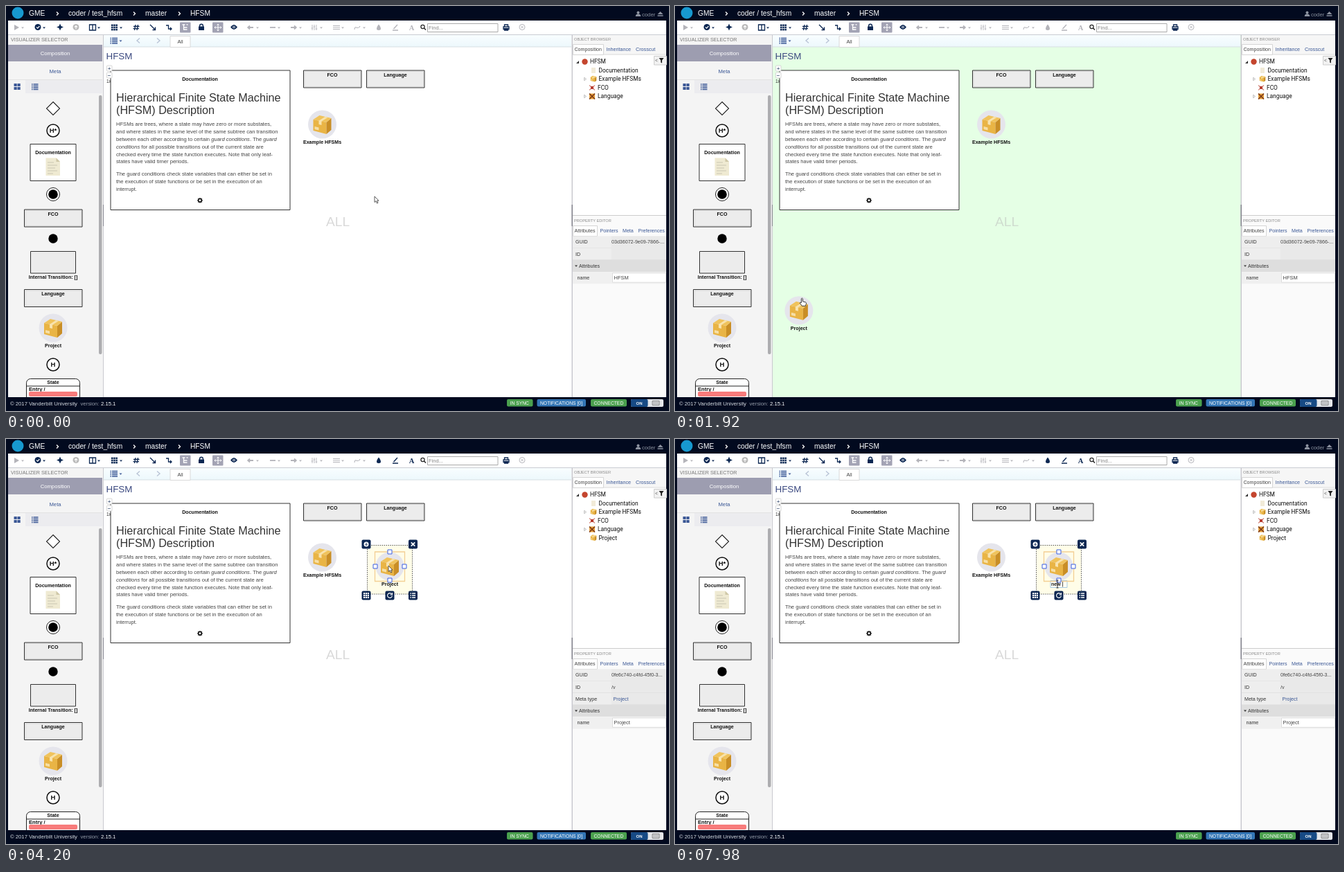
Recreate the animation shown at these times as an HTML page with a canvas. Size 957 by 585 pixels, loop 8 s.

```html
<!DOCTYPE html>
<html lang="en">
<head>
<meta charset="utf-8">
<title>State machine editor</title>
<style>
  html, body { margin: 0; width: 100%; height: 100%; overflow: hidden; background: #020a1f; }
  canvas { display: block; }
</style>
</head>
<body>
<canvas id="stage" width="957" height="585"></canvas>
<script>
const ctx = document.getElementById('stage').getContext('2d');
const LOOP = 8000;
const NAVY = '#0c2752', LINK = '#3a5795', GREY = '#b4b4ba', DARK = '#020a1f';

// ---- drawing helpers ----
function rect(x, y, w, h, fill, stroke, radius = 0, lineWidth = 1) {
  ctx.beginPath();
  ctx.roundRect(x, y, w, h, radius);
  paint(fill, stroke, lineWidth);
}
function circle(x, y, r, fill, stroke, lineWidth = 1) {
  ctx.beginPath();
  ctx.arc(x, y, r, 0, Math.PI * 2);
  paint(fill, stroke, lineWidth);
}
function paint(fill, stroke, lineWidth) {
  ctx.lineWidth = lineWidth;
  if (fill) { ctx.fillStyle = fill; ctx.fill(); }
  if (stroke) { ctx.strokeStyle = stroke; ctx.stroke(); }
}
function path(x, y, d, fill, stroke, lineWidth = 1) {
  const shape = new Path2D(d);
  ctx.save();
  ctx.translate(x, y);
  ctx.lineWidth = lineWidth;
  if (fill) { ctx.fillStyle = fill; ctx.fill(shape); }
  if (stroke) { ctx.strokeStyle = stroke; ctx.stroke(shape); }
  ctx.restore();
}
// y is the middle of the capital letters
function text(s, x, y, size, color = '#333', { style = '', align = 'left', font = 'Liberation Sans' } = {}) {
  ctx.font = `${style} ${size}px "${font}", Arial, sans-serif`;
  ctx.fillStyle = color;
  ctx.textAlign = align;
  ctx.fillText(s, x, y + size * 0.35);
  return ctx.measureText(s).width;
}
const label = (s, x, y) => text(s, x, y, 7.1, '#111', { style: 'bold', align: 'center' });
// parts between asterisks are italic
function richText(s, x, y, size, color) {
  s.split('*').forEach((part, i) => {
    x += text(part, x, y, size, color, { style: i % 2 ? 'italic' : '' });
  });
}
const caret = (x, y, color) => path(x, y, 'M-2 -1h4l-2 2.3z', color);

function gradient(y0, y1, from, to) {
  const g = ctx.createLinearGradient(0, y0, 0, y1);
  g.addColorStop(0, from);
  g.addColorStop(1, to);
  return g;
}

// ---- reusable pictures ----
function packageBox(x, y, scale = 1) {
  ctx.save();
  ctx.translate(x, y);
  ctx.scale(scale, scale);
  path(0, 0, 'M-13 -7L6 -3V14L-13 9z', '#e9b445');
  path(0, 0, 'M6 -3L13 -9V8L6 14z', '#c98e26');
  path(0, 0, 'M-13 -7L-4 -13L13 -9L6 -3z', '#f0c35c');
  path(0, 0, 'M-5 -5.3L4 -11L8 -10L-1 -4.5V1L-5 0z', '#f8e3ae');
  path(0, 0, 'M-11 3l6 1.4v4l-6 -1.5z', '#f6dfa6');
  ctx.restore();
}
function project(x, y, name) {
  circle(x, y, 20.5, '#e5e5ec');
  packageBox(x, y);
  if (name) label(name, x, y + 25.5);
}
function classBox(x, y, name) {
  rect(x + .5, y + .5, 83.5, 25, '#ececec', '#333');
  rect(x + 2, y + 2, 80.5, 22, null, '#dcdcdc');
  label(name, x + 42, y + 7);
}
function badge(s, x, w, fill) {
  rect(x, 568, w, 10.5, fill, null, 2);
  text(s, x + 4.5, 573.2, 6.75, '#fff');
}

// ---- interface ----
function header() {
  rect(0, 0, 957, 585, DARK);
  circle(17, 10, 8.5, '#1799cf');
  text('GME', 33, 10.5, 10.2, '#fff');
  text('coder / test_hfsm', 90, 10.5, 10.2, '#fff');
  text('master', 201, 10.5, 10.2, '#fff');
  text('HFSM', 266, 10.5, 10.2, '#fff');
  for (const x of [73, 184, 249]) path(x, 11, 'M0 -2.5l2.5 2.5l-2.5 2.5', null, '#fff', 1.3);
  circle(912.5, 9.5, 2, '#8d93a0');
  path(912.5, 15, 'M-3.8 0c0 -5 7.6 -5 7.6 0z', '#8d93a0');
  text('coder', 918, 12, 7.7, '#8d93a0');
  path(944.5, 12, 'M-4 0L0 -4L4 0zM-4 1.3h8v1.5h-8z', '#8d93a0');
}

function toolbar(selected) {
  rect(3, 21, 950, 21, '#fff');
  rect(3, 41, 950, 1, '#c9ccd2');
  const y = 31;
  const carets = { 24: GREY, 55: NAVY, 134: NAVY, 166: NAVY, 363: GREY, 394: GREY, 425: GREY, 455: GREY, 486: GREY, 517: GREY };
  for (const x in carets) caret(+x, y + .5, carets[x]);
  path(15, y, 'M-3 -4L4 0L-3 4z', GREY);
  circle(46, y - .5, 4.5, NAVY);
  path(46, y - .5, 'M-2 0l1.6 1.7l2.8 -3.2', null, '#fff', 1.2);
  path(78, y - .5, 'M0 -5l1.5 3.5L5 0L1.5 1.5L0 5L-1.5 1.5L-5 0L-1.5 -1.5z', NAVY);
  circle(101, y - .5, 4.5, '#bbb');
  path(101, y - .5, 'M0 3v-5m-2 2l2 -2l2 2', null, '#fff', 1.1);
  path(125, y, 'M-4.5 -4h9v8h-9zM0 -4v8', null, NAVY, 1.3);
  for (let i = 0; i < 9; i++) rect(152 + i % 3 * 3.2, 26.5 + Math.floor(i / 3) * 3.2, 2.5, 2.5, NAVY);
  path(188, y, 'M-1 -4l-1.5 8M2.5 -4l-1.5 8M-4 -1.5h8.5M-4.5 1.7h8.5', null, NAVY, 1.3);
  path(212, y, 'M-4 -4L3 3M3.5 -.5v4h-4', null, NAVY, 1.4);
  path(235, y, 'M-4 -3h3.5v5h4M2 0l2 2l-2 2', null, NAVY, 1.3);
  for (const x of [251, 298]) rect(x, 23.5, 15.5, 15, '#a3a3b4', null, 1);
  path(258.5, y, 'M-4 -4h4M-2 -4v7h5M-2 0h5M2 -4h2', null, '#fff', 1.3);
  path(306, y, 'M0 -5v10M-5 0h10M-1.5 -3.5L0 -5l1.5 1.5M-1.5 3.5L0 5l1.5 -1.5M-3.5 -1.5L-5 0l1.5 1.5M3.5 -1.5L5 0l-1.5 1.5', null, '#fff');
  rect(278, 29.5, 8, 5.5, NAVY);
  path(282, y, 'M-2.4 -1v-1.3a2.4 2.4 0 0 1 4.8 0V-1', null, NAVY, 1.4);
  path(329, y - .5, 'M-5 0Q0 -7 5 0Q0 7 -5 0z', NAVY);
  circle(329, y - .5, 1.8, '#fff');
  circle(329, y - .5, 1, NAVY);
  path(353, y, 'M4 0h-7M-1 -2.5l-2.8 2.5l2.8 2.5', null, GREY, 1.8);
  path(385, y, 'M-4 0h8', null, GREY, 1.8);
  path(415, y, 'M-4 0h7M1 -2.5l2.8 2.5l-2.8 2.5', null, GREY, 1.8);
  path(445, y, 'M-3 -4v8M0 -4v8M3 -4v8M-4.3 1h2.6M-1.3 -1h2.6M1.7 2h2.6', null, GREY, .9);
  path(477, y, 'M-5 -2.5h10M-5 0h10M-5 2.5h10', null, GREY, 1.2);
  path(507, y, 'M-4 3c1 -8 5 2 8 -5', null, GREY, 1.1);
  const styleColor = selected ? NAVY : GREY;
  path(538, y, 'M0 -4.5C4 .5 4 4 0 4S-4 .5 0 -4.5z', styleColor);
  path(562, y, 'M-2.5 2L3 -4M-4 4h8', null, styleColor, 1.4);
  text('A', 585.5, y, 10.5, styleColor, { align: 'center', font: 'Liberation Serif', style: 'bold' });
  circle(601.5, y - 1, 2.6, null, '#222', 1.2);
  path(603.5, y + 1, 'M0 0l2.5 2.5', null, '#222', 1.4);
  rect(608.5, 25.5, 101.5, 12, '#fff', '#aaa');
  text('Find...', 610, y, 7.5, '#888');
  path(722, y, 'M-2.5 -1v-3h5v3M-4 -1h8v3.5h-8zM-2.5 1.5h5v2.5h-5z', null, NAVY, 1.3);
  circle(745, y - .5, 4, null, GREY);
  path(745, y - .5, 'M-1.5 -1.5l3 3m0 -3l-3 3', null, GREY);
}

function palette() {
  rect(3, 42, 137, 523, '#f4f4f4');
  text('VISUALIZER SELECTOR', 7, 48, 7.2, '#777');
  rect(3, 56, 136, 24, '#9d9db0');
  text('Composition', 71, 68.5, 7.7, '#fff', { align: 'center' });
  text('Meta', 71, 94, 7.7, LINK, { align: 'center' });
  rect(3, 106, 136, 1, '#e2e2e2');
  rect(28, 107, 111, 19, '#ececef');
  for (const [x, y] of [[11.5, 112], [16.5, 112], [11.5, 117], [16.5, 117]]) rect(x, y, 4.2, 4, LINK);
  path(41.5, 116.5, 'M-2 -3.5h7M-2 -1h7M-2 1.5h7M-2 4h7M-4.5 -3.5h1.5M-4.5 -1h1.5M-4.5 1.5h1.5M-4.5 4h1.5', null, LINK, 1.4);
  rect(134, 129, 4.5, 374, '#adadb0', null, 2);

  path(68, 148, 'M0 -9.5L9.5 0L0 9.5L-9.5 0z', '#fff', '#222', 1.1);
  for (const [s, y] of [['H*', 180], ['H', 518]]) {
    circle(68, y, 9, '#fff', '#111', 1.5);
    text(s, 68, y, 9.5, '#111', { style: 'bold', align: 'center' });
  }
  rect(35, 199.5, 66, 53, '#fff', '#333');
  label('Documentation', 68, 211.5);
  path(57.5, 219.5, 'M0 0h15l5.5 5.5v20h-20.5z', '#efead2');
  path(57.5, 219.5, 'M15 0v5.5h5.5z', '#cfc8a8');
  path(60, 226, 'M0 0h9M0 4h14M0 8h11M0 12h14M0 16h8', null, '#c4c1ae', .9);
  circle(68, 272, 9.5, '#fff', '#222');
  circle(68, 272, 6.8, '#000');
  classBox(26, 293.5, 'FCO');
  circle(68, 336, 6.7, '#000');
  rect(35.5, 354.5, 65, 31.5, '#ececec', '#333');
  label('Internal Transition: []', 68, 392);
  classBox(26, 409, 'Language');
  project(68, 465, 'Project');

  rect(29.5, 538.5, 77, 40, '#fff', '#222', 6);
  label('State', 68, 543.5);
  rect(29.5, 548.5, 77, 1, '#222');
  text('Entry /', 33, 553, 7.6, '#111', { style: 'bold' });
  rect(33, 557, 70, 7, '#f87b7b', null, 2);
}

function documentBox() {
  rect(151, 93, 259, 201.5, '#fff', '#333');
  label('Documentation', 280, 106);
  text('Hierarchical Finite State Machine', 159, 132.5, 16.2);
  text('(HFSM) Description', 159, 150.5, 16.2);
  [
    'HFSMs are trees, where a state may have zero or more substates,',
    'and where states in the same level of the same subtree can transition',
    'between each other according to certain *guard conditions*. The *guard',
    '*conditions* for all possible transitions out of the current state are',
    'checked every time the state function executes. Note that only leaf-',
    'states have valid timer periods.'
  ].forEach((line, i) => richText(i === 3 ? '*' + line.slice(1) : line, 159, 170.7 + i * 10.8, 7.6, '#444'));
  [
    'The guard conditions check state variables that can either be set in',
    'the execution of state functions or be set in the execution of an',
    'interrupt.'
  ].forEach((line, i) => text(line, 159, 242.3 + i * 10.8, 7.6, '#444'));
  circle(280, 280.7, 2.2, null, '#111', 1.5);
  for (let i = 0; i < 8; i++) {
    const a = i * Math.PI / 4, c = Math.cos(a), s = Math.sin(a);
    path(280, 280.7, `M${c * 2.4} ${s * 2.4}L${c * 3.8} ${s * 3.8}`, null, '#111', 1.4);
  }
}

function canvasPanel(accepting) {
  rect(140, 42, 678, 523, accepting ? '#e5ffe5' : '#fff');
  rect(141, 42, 675, 17, gradient(42, 59, '#f8fdff', '#edf8fc'));
  rect(141, 58.5, 675, 1, '#d7dfe3');
  rect(237, 43.5, 29, 16, '#fff', '#d9d9d9');
  text('All', 251.5, 51.5, 7.4, '#444', { align: 'center' });
  path(155, 50, 'M-2 -3.5h8M-2 -1h8M-2 1.5h8M-2 4h8M-4.5 -3.5h1.5M-4.5 -1h1.5M-4.5 1.5h1.5M-4.5 4h1.5', null, LINK, 1.5);
  caret(165.5, 50.5, LINK);
  path(190, 50, 'M3 -3.5L-1 0l4 3.5', null, '#b9c4d6', 1.4);
  path(220, 50, 'M-2 -3.5L2 0l-4 3.5', null, '#b9c4d6', 1.4);
  text('HFSM', 144.5, 72.5, 13.4, '#3c4a80');
  text('ALL', 479, 311, 19.2, accepting ? '#cfdccf' : '#d9d9d9', { align: 'center' });
  text('1x', 145, 109, 6.5);
  documentBox();
  for (const [s, y] of [['+', 90], ['−', 100]]) {
    rect(145.5, y - 4, 7.5, 8, '#fff', '#ccc', 1, .8);
    text(s, 149.2, y, 8, NAVY, { align: 'center' });
  }
  classBox(429, 92.5, 'FCO');
  classBox(520, 92.5, 'Language');
  project(456.5, 171, 'Example HFSMs');
  for (const x of [139.5, 816.5]) {
    rect(x, 42, 1.5, 523, '#c9c9cf');
    rect(x, 287, 1.5, 31, '#85858f');
  }
}

function objectBrowser(created) {
  rect(818, 42, 135, 523, '#fff');
  rect(818, 42, 135, 27, '#f6f6f6');
  text('OBJECT BROWSER', 820, 48, 5.65, '#888');
  rect(818.5, 55.5, 44, 15, '#fff', '#d5d5d5');
  text('Composition', 820.5, 62.5, 7.1, '#444');
  text('Inheritance', 866.5, 62.5, 7.2, LINK);
  text('Crosscut', 909, 62.5, 7.2, LINK);
  rect(863, 69.5, 90, 1, '#d5d5d5');
  rect(935.5, 72.5, 18, 12.5, '#f2f2f2', '#ccc');
  text('<', 937, 78.5, 6.5, '#555');
  path(946, 78.5, 'M-3.5 -3.5h7l-2.6 3.5v4l-1.8 -1v-3z', '#222');

  const item = (s, x, y) => text(s, x, y, 8.4, '#111', { font: 'Roboto' });
  path(825, 81, 'M2 -2v4h-4z', '#333');
  circle(835.5, 80.5, 4.2, '#c4452e');
  item('HFSM', 843, 80.5);
  rect(845, 89, 6, 8, '#f1ebd8');
  item('Documentation', 855.5, 93);
  packageBox(848, 105, .33);
  item('Example HFSMs', 855.5, 105.5);
  path(846, 118, 'M-4 -3.5l8 7m0 -7l-8 7', null, '#d58a80', 1.4);
  rect(844, 116, 4, 4, '#b83d30');
  item('FCO', 854, 118);
  rect(842, 126.5, 8, 8, '#e7a03a');
  path(846, 130.5, 'M-4 -4l8 8m0 -8l-8 8', null, '#7c3a1c', 1.6);
  item('Language', 854, 130.5);
  for (const y of [105.5, 130.5]) path(836, y, 'M-1.3 -2.2L1.5 0L-1.3 2.2z', null, '#aaa', .8);
  if (created) {
    packageBox(848, 142.5, .33);
    item('Project', 855.5, 143);
  }
}

function propertyEditor(selected) {
  rect(818, 302, 135, 263, '#fafafa');
  rect(818, 302, 135, 1, '#ccc');
  text('PROPERTY EDITOR', 820, 310, 5.65, '#888');
  rect(818.5, 317.5, 35, 15, '#fff', '#d5d5d5');
  text('Attributes', 820.5, 324.5, 7.1, '#444');
  text('Pointers', 857.5, 324.5, 7.1, LINK);
  text('Meta', 890, 324.5, 7.1, LINK);
  text('Preferences', 912.5, 324.5, 7.1, LINK);
  let y = 332.5;
  const row = (name, value = '', color = '#444') => {
    rect(818, y, 135, 16.8, '#eeeeee');
    rect(874, y, 79, 16.8, '#e9e9e9');
    rect(818, y + 16.5, 135, .8, '#dcdcdc');
    text(name, 822, y + 8.5, 7.1);
    text(value, name === 'Meta type' ? 876.5 : 874, y + 8.5, 7.1, color);
    y += 17.2;
  };
  row('GUID', selected ? '0fe6c740-c4fd-45f0-3...' : '03d36072-9e09-7866-...');
  row('ID', selected ? '/v' : '');
  if (selected) row('Meta type', 'Project', LINK);
  rect(818, y, 135, 17, '#dedede');
  caret(823, y + 8.5, '#333');
  text('Attributes', 827, y + 8.5, 7.1);
  y += 17.3;
  rect(818, y, 135, 17, '#f0f0f0');
  text('name', 824.5, y + 8.5, 7.1);
  rect(875.5, y + 1.5, 77, 13.5, '#fff', '#ddd');
  text(selected ? 'Project' : 'HFSM', 877.5, y + 8, 7.5, '#444');
}

function footer(ahead) {
  rect(0, 565, 957, 20, DARK);
  text('© 2017 Vanderbilt University', 6, 574.5, 7.7, '#d5d8df');
  text('version:', 107.5, 574.5, 7.7, '#969ba8');
  text('2.15.1', 137, 574.5, 7.7, '#fff');
  if (ahead) {
    badge('AHEAD[1]', 708, 52, '#42b4da');
    rect(746.5, 568, .8, 10.5, '#2b8fb3');
    path(753.5, 573.5, 'M-2.2 1.2h4.4l-2.2 -2.5z', '#fff');
  } else badge('IN SYNC', 723, 37.5, '#4aa04e');
  badge('NOTIFICATIONS [0]', 766.5, 70.5, '#3375b5');
  badge('CONNECTED', 844, 52, '#4aa04e');
  rect(902, 568, 47, 11, '#e4e6ea', null, 2);
  rect(902, 568, 24.5, 11, '#174a85', null, 2);
  text('ON', 914, 573.5, 6, '#fff', { style: 'bold', align: 'center' });
  rect(933, 570.5, 10, 6, null, '#777', 0, .9);
  path(934, 572.5, 'M0 0h8M0 2h8', null, '#999', .9);
}

// ---- the new object and its selection ----
const NODE = { x: 554, y: 184 };

function selectionFrame() {
  rect(521.5, 153.5, 65, 70.5, '#fffde8');
  ctx.setLineDash([1.5, 1.5]);
  rect(521.5, 153.5, 65, 70.5, null, '#555');
  ctx.setLineDash([]);
}
function selectionHandles() {
  rect(532.5, 163, 43, 42.5, null, '#f3cf94', 0, 1.3);
  for (const [x, y] of [[554, 163], [533, 184], [575, 184], [554, 204]]) rect(x - 3, y - 3, 6, 6, '#fff', '#3b5fe0');
  for (const [x, y] of [[520, 152], [587.5, 152], [520, 226], [554, 226], [587.5, 226]]) rect(x - 6.5, y - 6.5, 13, 13, NAVY, null, 2);
  circle(520, 152, 3.5, '#fff');
  path(520, 152, 'M0 -2v3M-1.5 0L0 1.7L1.5 0', null, NAVY);
  path(587.5, 152, 'M-2.7 -2.7l5.4 5.4m0 -5.4l-5.4 5.4', null, '#fff', 1.7);
  for (let i = 0; i < 9; i++) rect(516 + i % 3 * 2.9, 222 + Math.floor(i / 3) * 2.9, 2.2, 2.2, '#fff');
  path(554, 226, 'M2.4 -2.4A3.4 3.4 0 1 0 3.4 .5M3.4 -4v3h-3', null, '#fff', 1.2);
  path(587.5, 226, 'M-1.5 -3h5M-1.5 0h5M-1.5 3h5M-4 -3h1.5M-4 0h1.5M-4 3h1.5', null, '#fff', 1.4);
}
function typedName(t) {
  const typed = 'new '.slice(0, Math.max(0, Math.floor((t - 7100) / 200)));
  const deleted = Math.max(0, Math.floor((t - 5230) / 130));
  return typed || 'Project'.slice(0, Math.max(0, 7 - deleted));
}
function nameInput(name) {
  rect(542, 204.5, 24, 10, '#fffef4', '#9cc4e4', 0, .9);
  const width = text(name, 543, 209.5, 7.1, '#222', { style: 'bold' });
  rect(543.5 + width, 205.5, .8, 8, '#222');
}

// ---- motion ----
const POINTER = [[0, 532, 275], [80, 530, 275], [600, 404, 304], [1200, 72, 455], [1480, 73, 453],
  [1920, 183, 422], [2370, 495, 235], [2620, 551, 169], [2850, 551, 169], [3180, 534, 166],
  [3700, 550, 181], [4200, 552, 183], [4600, 552, 209]];
const DRAGGED = [[1480, 68, 465], [1920, 178.5, 440], [2370, 498.5, 254.5], [2620, 554, 184]];

function along(keys, t) {
  const next = keys.findIndex(k => k[0] > t);
  if (next < 1) return (next ? keys[keys.length - 1] : keys[0]).slice(1);
  const [t0, x0, y0] = keys[next - 1], [t1, x1, y1] = keys[next];
  const p = (t - t0) / (t1 - t0), e = p + (p * p * (3 - 2 * p) - p) * .5;
  return [x0 + (x1 - x0) * e, y0 + (y1 - y0) * e];
}
function pointer(t) {
  const [x, y] = along(POINTER, t);
  const overPalette = t > 1130 && t < 1480;
  if (t >= 4560) {
    path(x, y, 'M-1.5 -5h3M0 -5v11M-1.5 6h3', null, '#222', .9);
  } else if (overPalette || (t >= 1480 && t < 2700)) {
    path(x, y, 'M-1 1q1 -1.5 2 0v4l4 1q1.5 .5 1 2.5l-1 3h-5l-3 -4q0 -2 2 -.7z', '#fff', '#222', .9);
  } else {
    path(x, y, 'M0 0V8.5L2 6.7L3.5 10L5 9.3L3.6 6.2H6z', '#fff', '#333', .8);
  }
}

function draw(t) {
  const dragging = t >= 1480 && t < 2650;
  const accepting = t >= 1680 && t < 2650;
  const created = t >= 3360;
  const selected = t >= 4080;
  const editing = t >= 4680;
  header();
  toolbar(selected);
  canvasPanel(accepting);
  palette();
  objectBrowser(created);
  propertyEditor(selected);
  footer(t >= 2820 && t < 3420);
  if (selected) selectionFrame();
  if (created) project(NODE.x, NODE.y, editing ? '' : 'Project');
  if (editing) nameInput(typedName(t));
  if (selected) selectionHandles();
  if (dragging) project(...along(DRAGGED, t), 'Project');
  pointer(t);
}

const start = performance.now();
function tick() {
  draw((performance.now() - start) % LOOP);
  requestAnimationFrame(tick);
}
tick();
</script>
</body>
</html>
```
